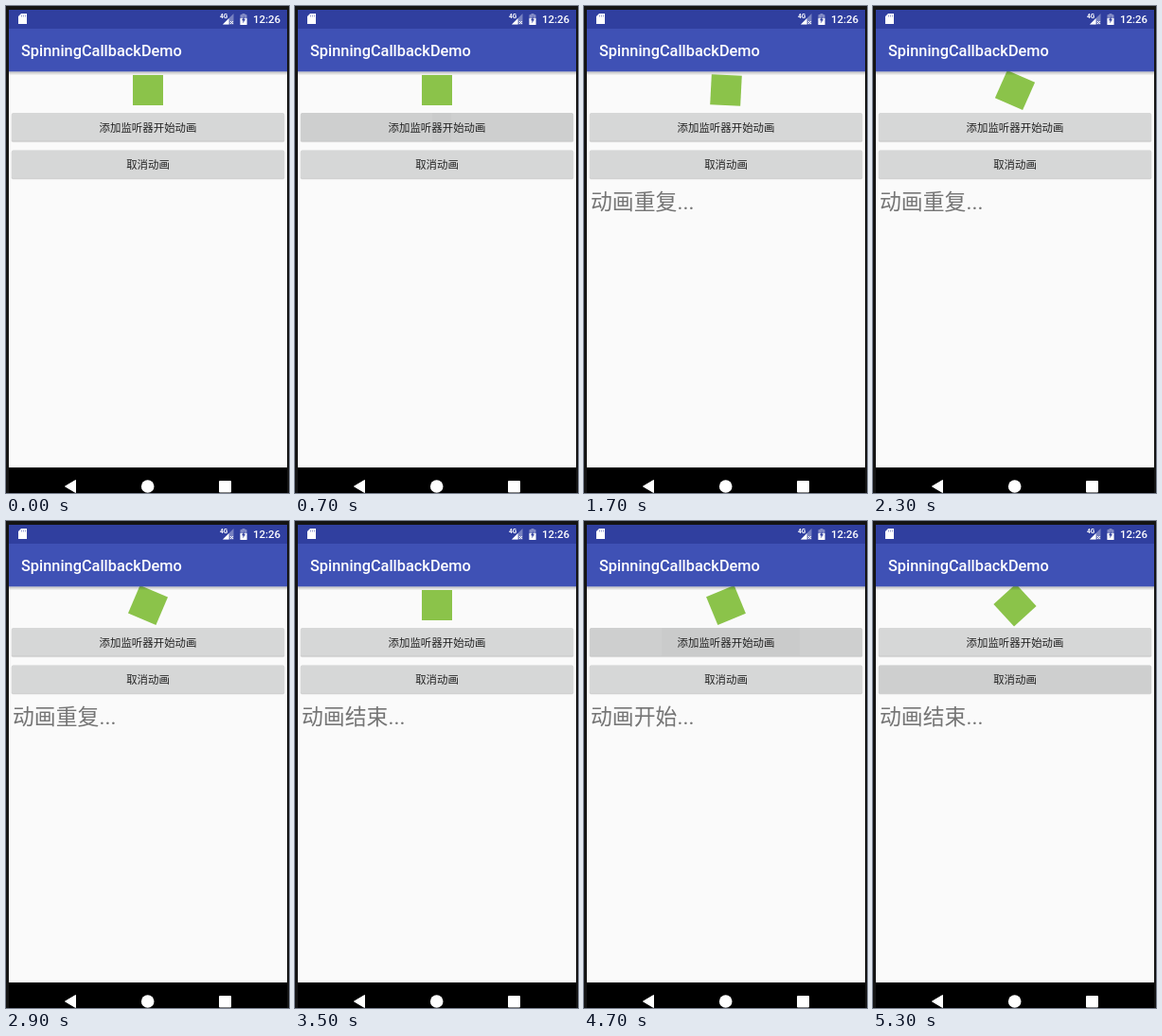
An HTML page with a canvas that plays this animation: 299 px wide and 515 px high, repeating every 6800 ms.

```html
<!DOCTYPE html>
<html lang="zh-CN">
<head>
<meta charset="utf-8">
<title>Rotation callbacks</title>
<style>
  html, body { margin: 0; width: 100%; height: 100%; overflow: hidden; background: #111; }
  canvas { display: block; width: 299px; height: 515px; }
</style>
</head>
<body>
<canvas id="stage"></canvas>
<script>
const W = 299, H = 515, LOOP = 6800, STEP = 100;
const DP = 294 / 360;
const canvas = document.getElementById('stage');
const ctx = canvas.getContext('2d');
const dpr = window.devicePixelRatio || 1;
canvas.width = W * dpr;
canvas.height = H * dpr;

const FONT = 'Roboto, "Noto Sans CJK SC", "Noto Sans CJK", sans-serif';
const RUNS = [
  { start: 740, period: 908, stop: 3464 },
  { start: 4415, period: 1000, stop: 5000, hold: true }
];

function rect(x, y, w, h, color) {
  ctx.fillStyle = color;
  ctx.fillRect(x, y, w, h);
}

function round(x, y, w, h, r, color) {
  ctx.fillStyle = color;
  ctx.beginPath();
  ctx.roundRect(x, y, w, h, r);
  ctx.fill();
}

function poly(points, color) {
  ctx.fillStyle = color;
  ctx.beginPath();
  points.forEach(([x, y]) => ctx.lineTo(x, y));
  ctx.closePath();
  ctx.fill();
}

function text(str, x, y, size, color, weight = 400, align = 'left') {
  ctx.font = `${weight} ${size}px ${FONT}`;
  ctx.textAlign = align;
  ctx.fillStyle = color;
  ctx.fillText(str, x, y);
}

function angleAt(t) {
  const run = RUNS.findLast(r => t >= r.start);
  if (!run || (t > run.stop && !run.hold)) return 0;
  const f = (Math.min(t, run.stop) - run.start) / run.period % 1;
  return Math.PI * (1 - Math.cos(Math.PI * f));
}

function messageAt(t) {
  if (t < 800) return '';
  if (t < 1700) return '动画开始...';
  if (t < 3500) return '动画重复...';
  if (t < 4500) return '动画结束...';
  return t < 5000 ? '动画开始...' : '动画结束...';
}

function drawStatusBar() {
  rect(3, 4, 294, 20, '#303f9f');

  poly([[16, 8], [22, 8], [22, 19], [13, 19], [13, 11]], '#fff');
  for (const x of [16, 18, 20]) rect(x, 9.5, 0.8, 2, 'rgba(48,63,159,.6)');

  text('4G', 226, 13, 6.5, '#fff', 700);
  poly([[229, 19.5], [240.5, 8], [240.5, 19.5]], 'rgba(255,255,255,.35)');
  poly([[229, 19.5], [235.5, 13], [235.5, 19.5]], '#fff');
  ctx.strokeStyle = '#fff';
  ctx.lineWidth = 1;
  ctx.beginPath();
  ctx.moveTo(237, 16); ctx.lineTo(240, 19);
  ctx.moveTo(240, 16); ctx.lineTo(237, 19);
  ctx.stroke();

  round(247.5, 9, 7, 11, 0.8, 'rgba(255,255,255,.4)');
  rect(249.5, 8, 3, 1, 'rgba(255,255,255,.4)');
  rect(247.5, 13, 7, 7, '#fff');
  poly([[251.8, 10.5], [249, 15.2], [250.6, 15.2], [250.2, 18.5],
        [253, 13.8], [251.4, 13.8]], '#303f9f');
  text('12:26', 290, 18, 14 * DP, '#fff', 500, 'right');
}

function drawToolbar() {
  const bottom = 4 + 80 * DP;
  const shadow = ctx.createLinearGradient(0, bottom, 0, bottom + 4);
  shadow.addColorStop(0, 'rgba(0,0,0,.25)');
  shadow.addColorStop(1, 'rgba(0,0,0,0)');
  rect(3, bottom, 294, 4, shadow);
  rect(3, 24, 294, bottom - 24, '#3f51b5');
  text('SpinningCallbackDemo', 16, 52.5, 20 * DP, '#fff', 500);
}

function drawButton(y, label, shade, ripple) {
  round(5.5, y + 0.8, 289, 30.4, 2, 'rgba(0,0,0,.09)');
  round(6, y + 0.4, 288, 30, 1.5, 'rgba(0,0,0,.12)');
  round(6, y, 288, 29.6, 1.5, '#d6d7d7');
  if (shade) round(6, y, 288, 29.6, 1.5, `rgba(0,0,0,${shade})`);
  if (ripple) rect(155 - ripple, y, ripple * 2, 29.6, 'rgba(0,0,0,.02)');
  text(label, 150, y + 19.5, 14 * DP, '#222', 400, 'center');
}

function drawSquare(angle) {
  ctx.save();
  ctx.translate(150, 89);
  ctx.rotate(angle);
  rect(-16, -16, 32, 32, '#8bc34a');
  ctx.restore();
}

function drawNavigation() {
  rect(3, 488, 294, 27, '#000');
  ctx.lineJoin = 'round';
  poly([[62.5, 508], [73.5, 501.5], [73.5, 514.5]], '#fff');
  ctx.strokeStyle = '#fff';
  ctx.stroke();
  ctx.fillStyle = '#fff';
  ctx.beginPath();
  ctx.arc(149.7, 508, 6.8, 0, Math.PI * 2);
  ctx.fill();
  round(225, 502, 13, 12.5, 1, '#fff');
}

function draw(t) {
  ctx.setTransform(dpr, 0, 0, dpr, 0, 0);
  rect(0, 0, W, H, '#141414');
  rect(3, 69, 294, 420, '#fafafa');
  drawSquare(angleAt(t));
  drawStatusBar();
  drawToolbar();

  const sincePress = t < 4400 ? t - 700 : t - 4400;
  const pressed = sincePress >= 0 && sincePress < 600;
  const shade = pressed ? 0.04 * Math.min(1, (600 - sincePress) / 300) : 0;
  const ripple = pressed ? Math.min(139, 10 + sincePress * 0.21) : 0;
  drawButton(113, '添加监听器开始动画', shade, ripple);
  drawButton(152.4, '取消动画', t >= 5000 ? 0.035 : 0, 0);

  text(messageAt(t), 7, 215, 28 * DP, '#757575');
  drawNavigation();
}

const begin = performance.now();
function tick() {
  const t = (performance.now() - begin) % LOOP;
  draw(Math.floor(t / STEP) * STEP);
  requestAnimationFrame(tick);
}
tick();
</script>
</body>
</html>
```
